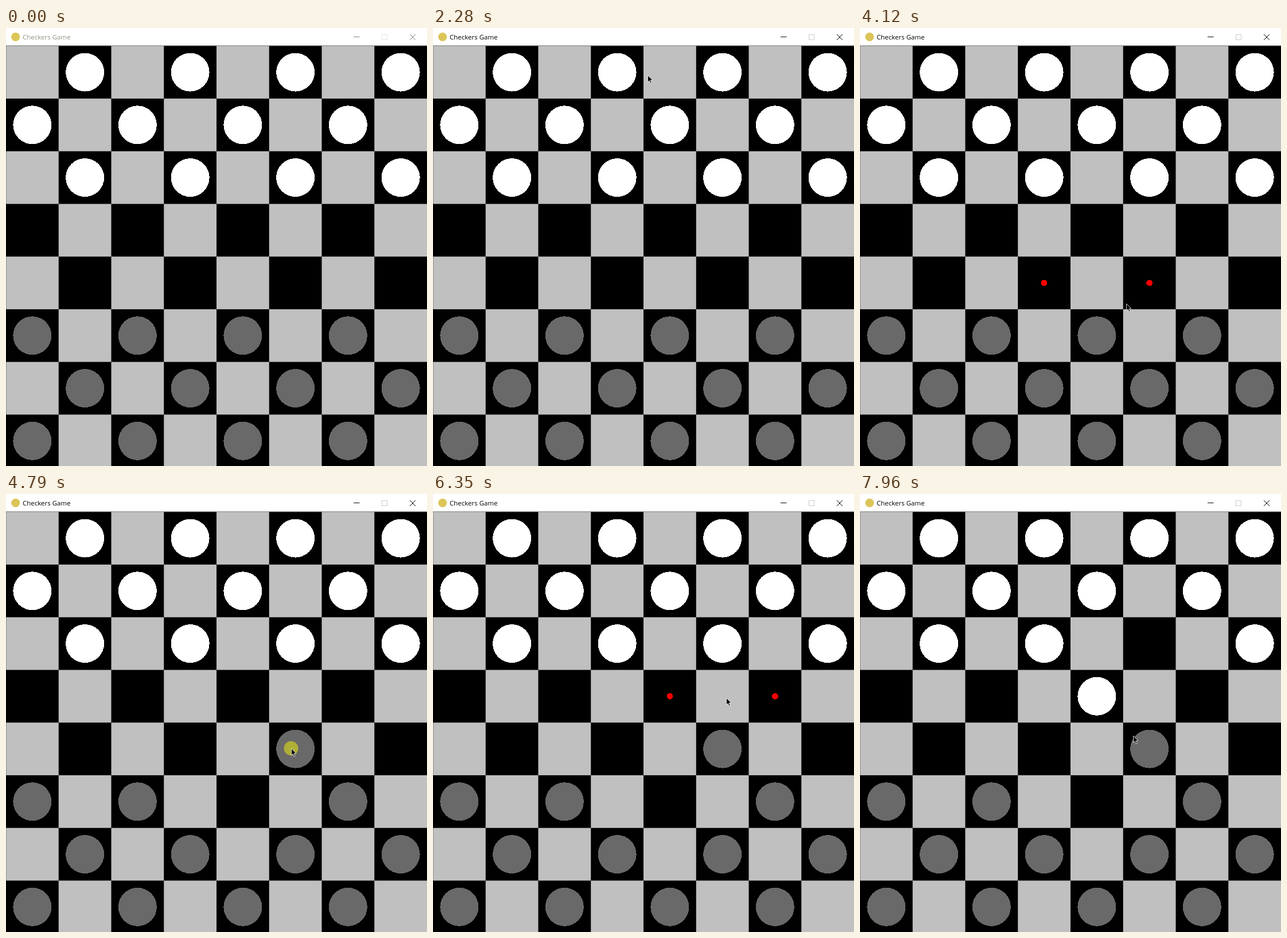
An HTML page for the animation above (8000 ms loop, 734 by 763 pixels).

```html
<!DOCTYPE html>
<html lang="en">
<head>
<meta charset="utf-8">
<title>Checkers Game</title>
<style>
  html, body { margin: 0; width: 100%; height: 100%; overflow: hidden; background: #fff; }
  svg { display: block; width: 734px; height: 763px; }
  text { font: 11.5px "Open Sans", "Noto Sans", sans-serif; }
  #pieces, #hints { shape-rendering: crispEdges; }
</style>
</head>
<body>
<svg viewBox="0 0 734 763">
  <circle cx="16.7" cy="15.5" r="7.6" fill="#dcc558"/>
  <text id="title" x="29" y="20">Checkers Game</text>
  <path id="buttons" d="M606 15.5h10.5M704 11l10 10M714 11l-10 10" fill="none"/>
  <rect id="maxBox" x="655.5" y="11.5" width="9" height="9" fill="none"/>
  <g id="board"></g>
  <g id="pieces"></g>
  <g id="hints" fill="#f00"></g>
  <circle id="click" r="12.5" fill="#ff0" fill-opacity=".47"/>
  <path id="cursor" d="M.5 .5V12.3L3.2 9.8 5.2 14.2 7.1 13.3 5.2 9 9 8.8Z" fill="#000" stroke="#fff" stroke-width=".8"/>
</svg>
<script>
const LOOP = 8000, CELL = 91.75, TOP = 31.2;
const FOCUS = 1840, CLICK_TIME = 215, STEP = 33;
const $ = id => document.getElementById(id);

function set(el, attrs) {
  for (const k in attrs) el.setAttribute(k, attrs[k]);
}
function add(parent, tag, attrs) {
  const el = document.createElementNS('http://www.w3.org/2000/svg', tag);
  set(el, attrs);
  parent.append(el);
  return el;
}
const show = (el, on) => set(el, { visibility: on ? 'visible' : 'hidden' });
const centre = ([col, row]) => ({ cx: (col + .5) * CELL, cy: TOP + (row + .5) * CELL });

// Board and starting pieces
add($('board'), 'rect', { y: TOP, width: 734, height: 734, fill: '#000' });
add($('board'), 'rect', { y: 30, width: 734, height: 1, fill: '#a4aaa2' });
const pieces = {};
for (let row = 0; row < 8; row++) {
  for (let col = 0; col < 8; col++) {
    if ((row + col) % 2 === 0) {
      add($('board'), 'rect', { x: col * CELL, y: TOP + row * CELL, width: CELL, height: CELL, fill: '#c0c0c0' });
    } else if (row < 3 || row > 4) {
      pieces[[col, row]] = add($('pieces'), 'circle',
        { ...centre([col, row]), r: 33.5, fill: row < 3 ? '#fff' : '#696969' });
    }
  }
}
add($('board'), 'rect', { y: TOP, width: 1, height: 734, fill: '#000', 'fill-opacity': .25 });

// Each turn is one click on a piece and one on its new square
const turns = [
  { pick: 3660, drop: 4590, from: [4, 5], to: [5, 4] },
  { pick: 5600, drop: 7060, from: [5, 2], to: [4, 3] }
];
for (const turn of turns) {
  const [col] = turn.from, row = turn.to[1];
  turn.piece = pieces[turn.from];
  turn.dots = [-1, 1].map(side => add($('hints'), 'circle', { ...centre([col + side, row]), r: 5.4 }));
}
const clicks = [FOCUS, ...turns.flatMap(turn => [turn.pick, turn.drop])];

// Pointer strokes are curves that each start where the last one ended
const strokes = [
  { start: 370, end: 850, via: [220, 145], to: [380, 62] },
  { start: 1180, end: 1640, via: [388, 45], to: [374, 21] },
  { start: 2240, end: 2820, via: [370, 215], to: [428, 440] },
  { start: 3150, end: 3460, via: [424, 480], to: [417, 518] },
  { start: 3890, end: 4330, via: [452, 496], to: [485, 457] },
  { start: 4790, end: 5370, via: [563, 370], to: [506, 285] },
  { start: 5990, end: 6210, via: [545, 310], to: [567, 345] },
  { start: 6240, end: 6770, via: [467, 364], to: [447, 363] },
  { start: 6800, end: 6830, via: [445, 363], to: [443, 363] },
  { start: 7800, end: 7960, via: [458, 396], to: [480, 426] }
];
strokes.forEach((s, i) => s.from = i ? strokes[i - 1].to : [30, 256]);

const easeOut = p => p * (1.5 - .5 * p);

function pointer(t) {
  const s = strokes.findLast(s => t >= s.start);
  if (!s) return null;
  const step = Math.floor((t - s.start) / STEP + .1) + 1;
  const u = easeOut(Math.min(1, step * STEP / (s.end - s.start + STEP)));
  return s.from.map((a, i) => (1 - u) ** 2 * a + 2 * u * (1 - u) * s.via[i] + u * u * s.to[i]);
}

function draw(t) {
  const active = t >= FOCUS;
  set($('title'), { fill: active ? '#000' : '#929286' });
  set($('buttons'), { stroke: active ? '#000' : '#808080' });
  set($('maxBox'), { stroke: active ? '#ccc' : '#e4e4e4' });

  for (const { pick, drop, from, to, piece, dots } of turns) {
    set(piece, centre(t < drop ? from : to));
    dots.forEach(dot => show(dot, t >= pick && t < drop));
  }

  const pos = pointer(t);
  const clicking = clicks.some(c => t >= c && t < c + CLICK_TIME);
  show($('cursor'), pos);
  show($('click'), clicking);
  if (pos) {
    const [x, y] = pos.map(Math.round);
    set($('cursor'), { transform: `translate(${x} ${y})` });
    set($('click'), { cx: x, cy: y });
  }
}

const begin = performance.now();
function tick() {
  draw((performance.now() - begin) % LOOP);
  requestAnimationFrame(tick);
}
tick();
</script>
</body>
</html>
```
